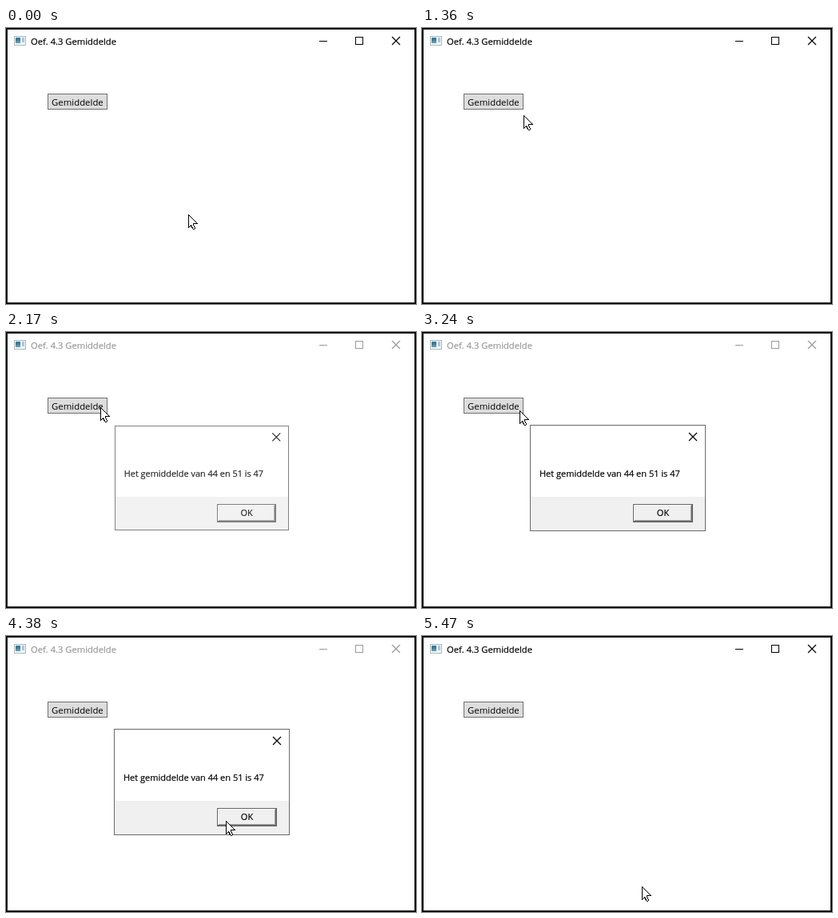
Recreate the animation shown at these times as an HTML page. Size 513 px wide and 345 px high, loop 6740 ms.

```html
<!DOCTYPE html>
<html lang="nl">
<head>
<meta charset="utf-8">
<title>Gemiddelde</title>
<style>
  html, body { margin: 0; width: 100%; height: 100%; overflow: hidden; background: #fff; }
  svg { display: block; width: 513px; height: 345px; font: 11px "Open Sans", "Noto Sans", sans-serif; }
  rect, .crisp { shape-rendering: crispEdges; }
  .line { fill: none; stroke: currentColor; }
  .cross { stroke-width: 1.2; }
  .dark { fill: currentColor; stroke: currentColor; stroke-width: .2; }
</style>
</head>
<body>
<svg viewBox="0 0 513 345">
  <rect width="513" height="345"/>
  <rect x="1" y="1" width="511" height="343" fill="#1b1b1b"/>
  <rect x="2" y="2" width="509" height="341" fill="#fff"/>

  <g id="icon">
    <rect x="10.5" y="10.5" width="14" height="11" fill="#f4f6f7" stroke="#b0b6ba"/>
    <rect x="12" y="12" width="6" height="7" fill="#3f789f"/>
    <rect x="12" y="16" width="6" height="3" fill="#5a9cae"/>
    <rect x="20" y="12" width="3" height="6" fill="#a5cbe2"/>
  </g>
  <g id="titlebar">
    <text class="dark" x="31" y="21" font-size="11.2">Oef. 4.3 Gemiddelde</text>
    <path class="line crisp" d="M392 16.5h10M437.5 11.5h9v9h-9z"/>
    <path class="line cross" d="M483 11l10 10M493 11l-10 10"/>
  </g>

  <rect id="button" x="52.5" y="82.5" width="74" height="19"/>
  <text x="57" y="97" font-size="11.4">Gemiddelde</text>

  <g id="dialog">
    <rect x="135.5" y="116.5" width="219" height="132" fill="#fff" stroke="#696969"/>
    <rect x="136" y="206" width="218" height="42" fill="#f0f0f0"/>
    <path id="close" class="line cross" d="M334 126l10 10M344 126l-10 10"/>
    <text class="dark" x="147" y="181">Het gemiddelde van 44 en 51 is 47</text>
    <rect x="264.5" y="215.5" width="74" height="22" fill="#f0f0f0" stroke="#646464"/>
    <g id="raised">
      <path class="line crisp" color="#fff" d="M265.5 236v-19.5H337"/>
      <path class="line crisp" color="#696969" d="M265 236.5h72.5V216"/>
      <path class="line crisp" color="#a0a0a0" d="M266 235.5h70.5V217"/>
    </g>
    <rect id="sunken" x="265.5" y="216.5" width="72" height="20" fill="none" stroke="#a0a0a0"/>
    <text id="ok" class="dark" x="301.5" y="230" text-anchor="middle">OK</text>
  </g>

  <path id="cursor" class="crisp" fill="#fff" stroke="#000"
    d="M.5 .5V16.5L3.5 13.5 5.5 17.5 6.5 18.5H7.5L8.5 17.5 6.5 12.5V11.5H11.5Z"/>
</svg>
<script>
const LOOP = 6740, TICK = 79;
const START = { x: 228, y: 233 };
const LEGS = [
  { from: 810, to: 1360, x: 127, y: 109 },
  { from: 1440, to: 1530, x: 118, y: 94 },
  { from: 3240, to: 3880, x: 249, y: 215 },
  { from: 3960, to: 4380, x: 275, y: 231 },
  { from: 5080, to: 5470, x: 275, y: 313 },
];

const set = (id, attributes) => {
  const node = document.getElementById(id);
  for (const name in attributes) node.setAttribute(name, attributes[name]);
};
const between = (t, from, to) => t >= from && t < to;
const smooth = p => p * p * (3 - 2 * p);

// Progress in screen updates: the first shows at `from`, the last at `to`
function progress(t, from, to) {
  if (t < from) return 0;
  const updates = Math.round((to - from) / TICK) + 1;
  return Math.min(1, (Math.floor((t - from) / TICK + 0.15) + 1) / updates);
}

function pointerAt(t) {
  let { x, y } = START;
  for (const leg of LEGS) {
    const p = smooth(progress(t, leg.from, leg.to));
    x += (leg.x - x) * p;
    y += (leg.y - y) * p;
  }
  return `translate(${Math.round(x)} ${Math.round(y)})`;
}

function draw(t) {
  const modal = between(t, 2000, 5000);
  const pressed = between(t, 1840, 2000);
  const hover = between(t, 1440, 1840);
  const okDown = between(t, 4850, 5000);
  const opening = 1 - (1 - progress(t, 2000, 2310)) ** 2;
  const opacity = opening - progress(t, 5000, 5310);

  set("titlebar", { color: modal ? "#999" : "#000" });
  set("button", {
    fill: pressed ? "#c4e5f6" : hover ? "#bee6fd" : "#ddd",
    stroke: pressed ? "#2c628b" : hover ? "#3c7fb1" : "#707070",
  });
  set("dialog", {
    opacity,
    transform: `translate(245 182.5) scale(${0.95 + 0.05 * opacity}) translate(-245 -182.5)`,
  });
  set("close", { opacity: t < 5000 ? 1 : 0 });
  set("raised", { opacity: okDown ? 0 : 1 });
  set("sunken", { opacity: okDown ? 1 : 0 });
  set("ok", { transform: okDown ? "translate(1 1)" : "" });
  set("cursor", { transform: pointerAt(t) });
}

const began = performance.now();
function tick() {
  draw((performance.now() - began) % LOOP);
  requestAnimationFrame(tick);
}
tick();
</script>
</body>
</html>
```
